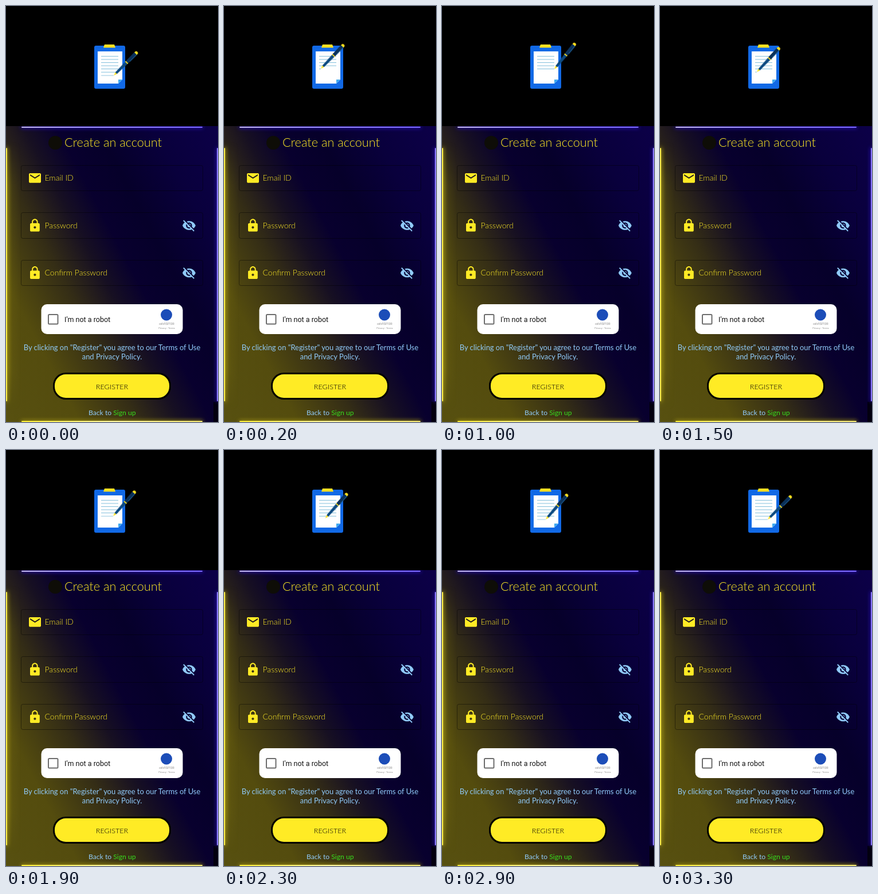
Recreate the animation shown at these times as an HTML page. Size 370x724 px, loop 3.5 s.

```html
<!DOCTYPE html>
<html lang="en">
<head>
<meta charset="utf-8">
<title>Create an account</title>
<style>
html, body { margin: 0; width: 100%; height: 100%; overflow: hidden; background: #000; }
.stage { position: relative; width: 370px; height: 724px; overflow: hidden; }
.panel {
  position: absolute; left: 0; top: 209px; width: 370px; height: 515px; overflow: hidden;
  background: linear-gradient(62deg, #575010 0%, #544c0e 20%, #342d16 36%, #171022 47%, #08002e 56%, #06002a 67%, #09003c 82%, #0c0048 100%);
}
.glow { position: absolute; left: 0; top: 0; width: 26px; height: 515px;
  background: linear-gradient(90deg, #b8aa1c55, #8a7c1422 45%, transparent);
  mask-image: linear-gradient(transparent 5%, #000 20%, #000 82%, transparent 96%); }
.corner { position: absolute; right: 0; bottom: 0; width: 8px; height: 35px; background: #000a; }
.bar { position: absolute; border-radius: 2px; }
.top { left: 27px; top: 1px; width: 316px; height: 2px;
  background: linear-gradient(90deg, #c3b8f0, #a396ff 35%, #7a68ff); box-shadow: 0 0 6px 1px #2c14b8; }
.bottom { left: 27px; bottom: 0; width: 316px; height: 2px;
  background: linear-gradient(90deg, #ffee35, #fff6a0 50%, #f0e470); box-shadow: 0 0 6px 1px #a89a18; }
.left { left: 0; top: 38px; width: 2px; height: 441px;
  background: #f8ea48; box-shadow: 0 0 6px 1px #a89a18; }
.right { right: 0; top: 38px; width: 2px; height: 441px;
  background: #8a7aff; box-shadow: 0 0 6px 1px #2c14b8; }
svg { position: absolute; inset: 0; }
text { font-family: Lato, "Open Sans", sans-serif; font-size: 14px; }
.thin { font-weight: 300; }
.mid { text-anchor: middle; }
.yellow { fill: #ffeb25; }
.sky { fill: #90caf9; }
.field { fill: none; stroke: #000; stroke-opacity: .42; }
.rule { stroke: #82bfdc; stroke-width: 1; }

#pen { animation: write 3500ms infinite; }
.ink { transform-origin: 166px 0; animation: 3500ms infinite; }
#ink1 { animation-name: ink1; }
#ink2 { animation-name: ink2; }
#ink3 { animation-name: ink3; }

/* The drawing advances ten times a second. */
@keyframes write {
  0%      { transform: translate(188px, 121px) rotate(-45deg); animation-timing-function: step-end; }
  2.857%  { transform: translate(166px, 109px) rotate(-46deg); animation-timing-function: steps(5); }
  17.142% { transform: translate(181px, 110px) rotate(-47deg); animation-timing-function: steps(4); }
  28.571% { transform: translate(196px, 110px) rotate(-51deg); animation-timing-function: steps(4); }
  40%     { transform: translate(166px, 115px) rotate(-47deg); animation-timing-function: steps(1); }
  42.857% { transform: translate(169px, 115px) rotate(-47deg); animation-timing-function: steps(6); }
  60%     { transform: translate(196px, 115px) rotate(-49deg); animation-timing-function: steps(3); }
  68.571% { transform: translate(167px, 121px) rotate(-48deg); animation-timing-function: steps(5); }
  82.857% { transform: translate(181px, 121px) rotate(-49deg); animation-timing-function: steps(4); }
  94.285%, 100% { transform: translate(188px, 121px) rotate(-45deg); }
}
@keyframes ink1 {
  0%      { transform: scaleX(1); animation-timing-function: step-end; }
  2.857%  { transform: scaleX(0); animation-timing-function: steps(5); }
  17.142% { transform: scaleX(.5); animation-timing-function: steps(4); }
  28.571%, 100% { transform: scaleX(1); }
}
@keyframes ink2 {
  0%      { transform: scaleX(1); animation-timing-function: step-end; }
  2.857%, 40% { transform: scaleX(0); animation-timing-function: steps(1); }
  42.857% { transform: scaleX(.1); animation-timing-function: steps(6); }
  60%, 100% { transform: scaleX(1); }
}
@keyframes ink3 {
  0%      { transform: scaleX(.73); animation-timing-function: step-end; }
  2.857%  { transform: scaleX(0); animation-timing-function: step-end; }
  68.571% { transform: scaleX(0); animation-timing-function: steps(5); }
  82.857% { transform: scaleX(.5); animation-timing-function: steps(4); }
  94.285%, 100% { transform: scaleX(.73); }
}
</style>
</head>
<body>
<div class="stage">
  <div class="panel">
    <div class="glow"></div>
    <div class="corner"></div>
    <div class="bar top"></div>
    <div class="bar bottom"></div>
    <div class="bar left"></div>
    <div class="bar right"></div>
  </div>

  <svg width="370" height="724" viewBox="0 0 370 724">
    <defs>
      <path id="lock" d="M18 8h-1V6c0-2.76-2.24-5-5-5S7 3.24 7 6v2H6c-1.1 0-2 .9-2 2v10c0 1.1.9 2 2 2h12c1.1 0 2-.9 2-2V10c0-1.1-.9-2-2-2zm-6 9c-1.1 0-2-.9-2-2s.9-2 2-2 2 .9 2 2-.9 2-2 2zm3.1-9H8.9V6c0-1.71 1.39-3.1 3.1-3.1 1.71 0 3.1 1.39 3.1 3.1v2z"/>
      <path id="eye" d="M12 7c2.76 0 5 2.24 5 5 0 .65-.13 1.26-.36 1.83l2.92 2.92c1.51-1.26 2.7-2.89 3.43-4.75-1.73-4.39-6-7.5-11-7.5-1.4 0-2.74.25-3.98.7l2.16 2.16C10.74 7.13 11.35 7 12 7zM2 4.27l2.28 2.28.46.46C3.08 8.3 1.78 10.02 1 12c1.73 4.39 6 7.5 11 7.5 1.55 0 3.03-.3 4.38-.84l.42.42L19.73 22 21 20.73 3.27 3 2 4.27zM7.53 9.8l1.55 1.55c-.05.21-.08.43-.08.65 0 1.66 1.34 3 3 3 .22 0 .44-.03.65-.08l1.55 1.55c-.67.33-1.41.53-2.2.53-2.76 0-5-2.24-5-5 0-.79.2-1.53.53-2.2zm4.31-.78l3.15 3.15.02-.16c0-1.66-1.34-3-3-3l-.17.01z"/>
    </defs>

    <!-- Clipboard -->
    <rect x="154" y="69" width="54" height="75" rx="3" fill="#1169e6"/>
    <path d="M160 79h43v49l-7 7h-36z" fill="#fff"/>
    <path d="M196 128h7l-7 7z" fill="#3fa9f0"/>
    <path d="M172 67h17l2 5.5h-21z" fill="#ffe01f"/>
    <path class="rule" d="M166 87.5h30M166 93h30M166 98.5h30M166 104h30"/>
    <path id="ink1" class="rule ink" d="M166 109.5h30"/>
    <path id="ink2" class="rule ink" d="M166 115.2h30"/>
    <path id="ink3" class="rule ink" d="M166 121h30"/>

    <!-- Pen, tip at the origin -->
    <g id="pen">
      <path d="M0 0L6 -2V2z" fill="#ffe01f"/>
      <path d="M6 -2L31 -2.8V2.8L6 2z" fill="#0d4a80"/>
      <path d="M32 -3L54 -3.2V3.2L32 3z" fill="#0b3159"/>
      <path d="M37 2.6h17" stroke="#1d5e95" stroke-width="1.2"/>
      <path d="M31 -3h1.8v6h-1.8z" fill="#ffe01f"/>
      <path d="M54 -3h1.4a3 3 0 0 1 0 6h-1.4z" fill="#ffe01f"/>
    </g>

    <circle cx="86" cy="238" r="12" fill="#0e0d07"/>
    <text class="yellow thin" x="102" y="245" style="font-size:21.7px">Create an account</text>

    <rect class="field" x="26.5" y="277.5" width="317" height="44" rx="3"/>
    <rect class="field" x="26.5" y="359.5" width="317" height="45" rx="3"/>
    <rect class="field" x="26.5" y="442.5" width="317" height="44" rx="3"/>
    <g class="yellow thin">
      <path transform="translate(37.9 286.8) scale(1.05)" d="M20 4H4c-1.1 0-2 .9-2 2v12c0 1.1.9 2 2 2h16c1.1 0 2-.9 2-2V6c0-1.1-.9-2-2-2zm0 4l-8 5-8-5V6l8 5 8-5v2z"/>
      <use href="#lock" transform="translate(37.8 369.5) scale(1.05)"/>
      <use href="#lock" transform="translate(37.8 452) scale(1.05)"/>
      <text x="67.5" y="304">Email ID</text>
      <text x="67.5" y="386.5">Password</text>
      <text x="67.5" y="469">Confirm Password</text>
    </g>
    <g class="sky">
      <use href="#eye" transform="translate(307 369.5) scale(1.04)"/>
      <use href="#eye" transform="translate(307 452) scale(1.04)"/>
    </g>

    <rect x="61.5" y="519" width="247" height="52" rx="10" fill="#fff"/>
    <rect x="74" y="537" width="16.5" height="16.5" rx="1.5" fill="none" stroke="#6d6d6d" stroke-width="2"/>
    <text x="102" y="550" fill="#111" style="font:12.5px Roboto,sans-serif">I'm not a robot</text>
    <circle cx="280" cy="537.5" r="10" fill="#1c4db8"/>
    <g class="mid" fill="#8c8c8c">
      <text x="280.5" y="555" style="font:5.6px Roboto,sans-serif">okVISITOR</text>
      <text x="280.5" y="562.3" style="font:4.2px Roboto,sans-serif">Privacy - Terms</text>
    </g>

    <g class="sky mid">
      <text x="185" y="599" style="font-size:12.9px">By clicking on "Register" you agree to our Terms of Use</text>
      <text x="185" y="615" style="font-size:12.9px">and Privacy Policy.</text>
    </g>

    <rect x="83.5" y="639.5" width="203" height="44" rx="21" fill="#ffeb25" stroke="#000" stroke-width="3"/>
    <text class="mid thin" x="185" y="666.5" fill="#000" style="font-size:12.6px">REGISTER</text>
    <text class="sky mid" x="185.3" y="711.5" style="font-size:12.2px">Back to <tspan fill="#37dc1e">Sign up</tspan></text>
  </svg>
</div>
</body>
</html>
```
